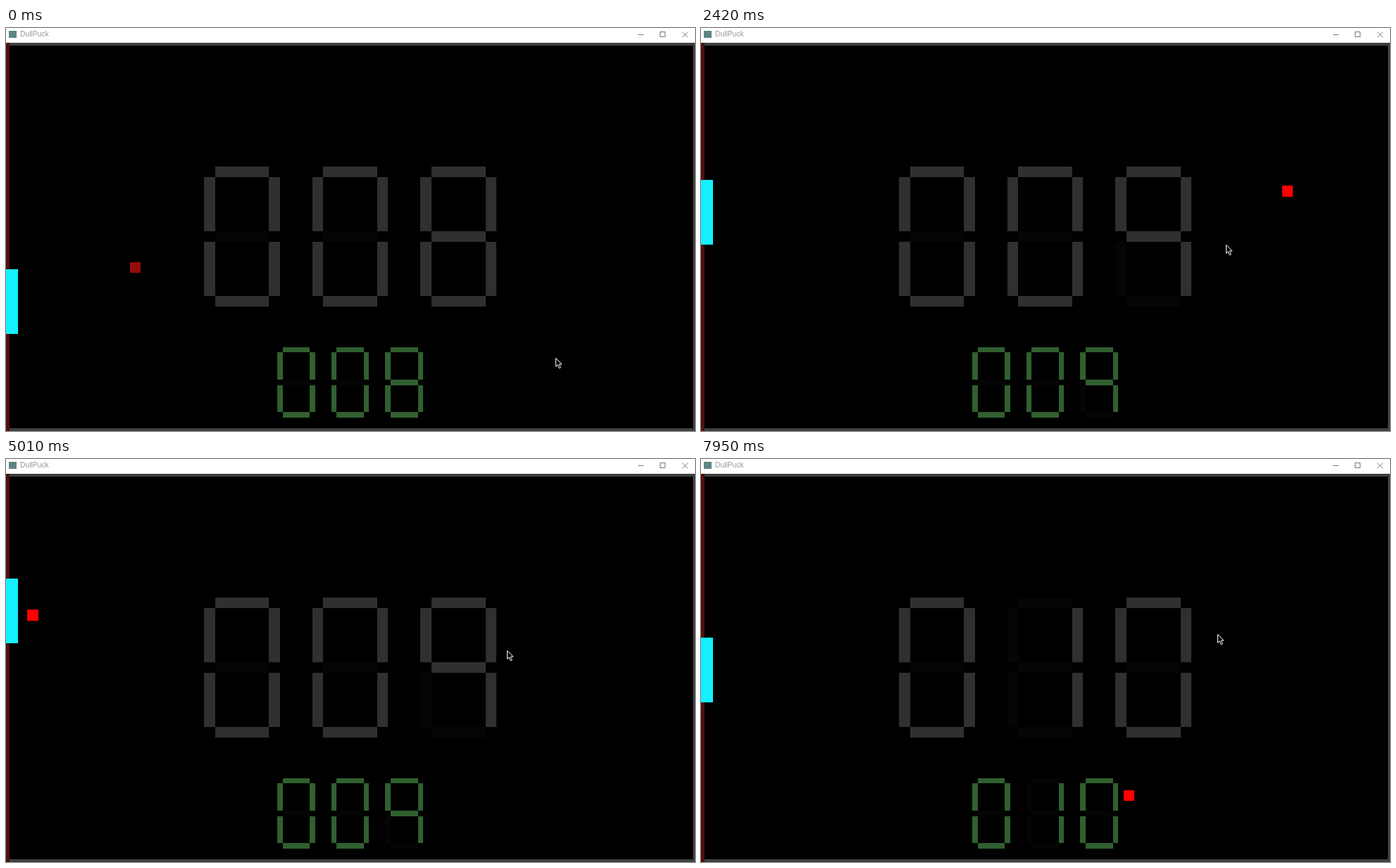
Animation, 978 px wide and 573 px high, one loop 8 s. Source, as an HTML page with a canvas:

```html
<!DOCTYPE html>
<html lang="en">
<head>
<meta charset="utf-8">
<title>DullPuck</title>
<style>
  html, body { margin: 0; width: 978px; height: 573px; overflow: hidden; background: #000; }
  canvas, header { position: absolute; left: 0; top: 0; }
  canvas { display: block; }
  header { width: 978px; height: 21px; background: #fff; }
  header i { position: absolute; left: 4px; top: 4px; width: 11px; height: 10px; background: #5d8585; }
  header span {
    position: absolute; left: 20px; top: 3px;
    font: 10.3px/12px "Liberation Sans", Arial, sans-serif; color: #999;
  }
  header svg { position: absolute; left: 0; top: 0; fill: none; stroke: #777; }
</style>
</head>
<body>
<canvas id="stage" width="978" height="573"></canvas>
<header>
  <i></i><span>DullPuck</span>
  <svg width="978" height="21">
    <path d="M897 9.5h8M928.5 5.5h7v7h-7zM960 5.5l8 8M968 5.5l-8 8"/>
  </svg>
</header>
<script>
const ctx = document.getElementById('stage').getContext('2d');
const LOOP = 8000, TICK = 100.6, LAST_TICK = 79;
const W = 978, H = 573, TOP = 21, WALL = 4, BALL = 15.36;

// Distance the ball has covered along each axis; it speeds up at paddle hits.
const travel = [[0, 0], [4.5, 166.5], [24, 981.5], [50.5, 2081.7], [70, 2993.7], [79, 3406.9]];

// The player's moves: tick, paddle top, cursor x, cursor y.
const moves = [
  [0, 343, 780, 469], [9, 443, 768.5, 356], [24, 216, 745, 308], [35, 212, 738.5, 243],
  [50, 170, 711.5, 272], [60, 230, 726, 230], [70, 139.5, 737.5, 194], [79, 254.5, 733.5, 249]
];

const linear = p => p;
const easeOut = p => 1 - (1 - p) ** 3;

function at(track, k, ease) {
  const i = Math.max(1, track.findIndex(([tick]) => tick >= k));
  const [t0, ...from] = track[i - 1], [t1, ...to] = track[i];
  const p = ease((k - t0) / (t1 - t0));
  return from.map((v, n) => v + (to[n] - v) * p);
}

// Reflects an endless straight path between two walls.
function bounce(path, low, high) {
  const span = high - low, turn = 2 * span;
  const rest = ((path - low) % turn + turn) % turn;
  return low + span - Math.abs(span - rest);
}

// Fills a box snapped to whole pixels.
function rect(x, y, w, h, color) {
  const left = Math.floor(x), top = Math.floor(y);
  ctx.fillStyle = color;
  ctx.fillRect(left, top, Math.floor(x + w) - left, Math.floor(y + h) - top);
}

// Segment boxes in cells of a 7 x 13 digit, clockwise from the top, middle last.
const segments = [[1, 0, 5, 1], [6, 1, 1, 5], [6, 7, 1, 5], [1, 12, 5, 1],
  [0, 7, 1, 5], [0, 1, 1, 5], [1, 6, 5, 1]];
const lit = { 0: '1111110', 1: '0110000', 8: '1111111', 9: '1110011' };

function counter(value, y, cell, color) {
  const left = W / 2 - 13.5 * cell;
  [...value].forEach((digit, n) => segments.forEach(([sx, sy, sw, sh], s) =>
    rect(left + (n * 10 + sx) * cell, y + sy * cell, sw * cell, sh * cell,
      lit[digit][s] === '1' ? color : '#050505')));
}

const arrow = new Path2D('M.5 .5V12.5L3.2 9.8 5.2 14.8 7.3 13.9 5.3 9.1H9z');
function cursor(x, y) {
  ctx.save();
  ctx.translate(Math.floor(x), Math.floor(y));
  ctx.fillStyle = '#000';
  ctx.strokeStyle = '#fff';
  ctx.fill(arrow);
  ctx.stroke(arrow);
  ctx.restore();
}

function draw(k) {
  const [way] = at(travel, k, linear);
  const x = bounce(176.5 - way, 10, 967.6);
  const y = bounce(333 + way, 15.6, 560.4);
  const [paddle, cursorX, cursorY] = at(moves, k, easeOut);
  const wall = hit => hit ? '#c0c0c0' : '#404040';
  const score = k < 5 ? '008' : k < 51 ? '009' : '010';
  const fade = Math.max(0, 1 - k / 4);

  rect(0, 0, W, H, '#000');
  rect(5, TOP, 970, WALL, wall(y < TOP + WALL));
  rect(5, H - WALL, 970, WALL, wall(y + BALL > H - WALL));
  rect(975, TOP, 3, H - TOP, wall(x + BALL > 975));
  rect(0, TOP, 5, H - TOP, '#501010');

  counter(score, 197.2, 15.36, '#303030');
  counter(score, 454.3, 7.68, '#306030');
  rect(0, paddle, 17, 92.2, '#14f0ff');
  rect(x, y, BALL, BALL, `rgb(${255 - 105 * fade},${12 * fade},${12 * fade})`);
  cursor(cursorX, cursorY);
}

function frame() {
  const time = performance.now() % LOOP;
  draw(Math.min(LAST_TICK, Math.floor(time / TICK + 0.25)));
  requestAnimationFrame(frame);
}
frame();
</script>
</body>
</html>
```
